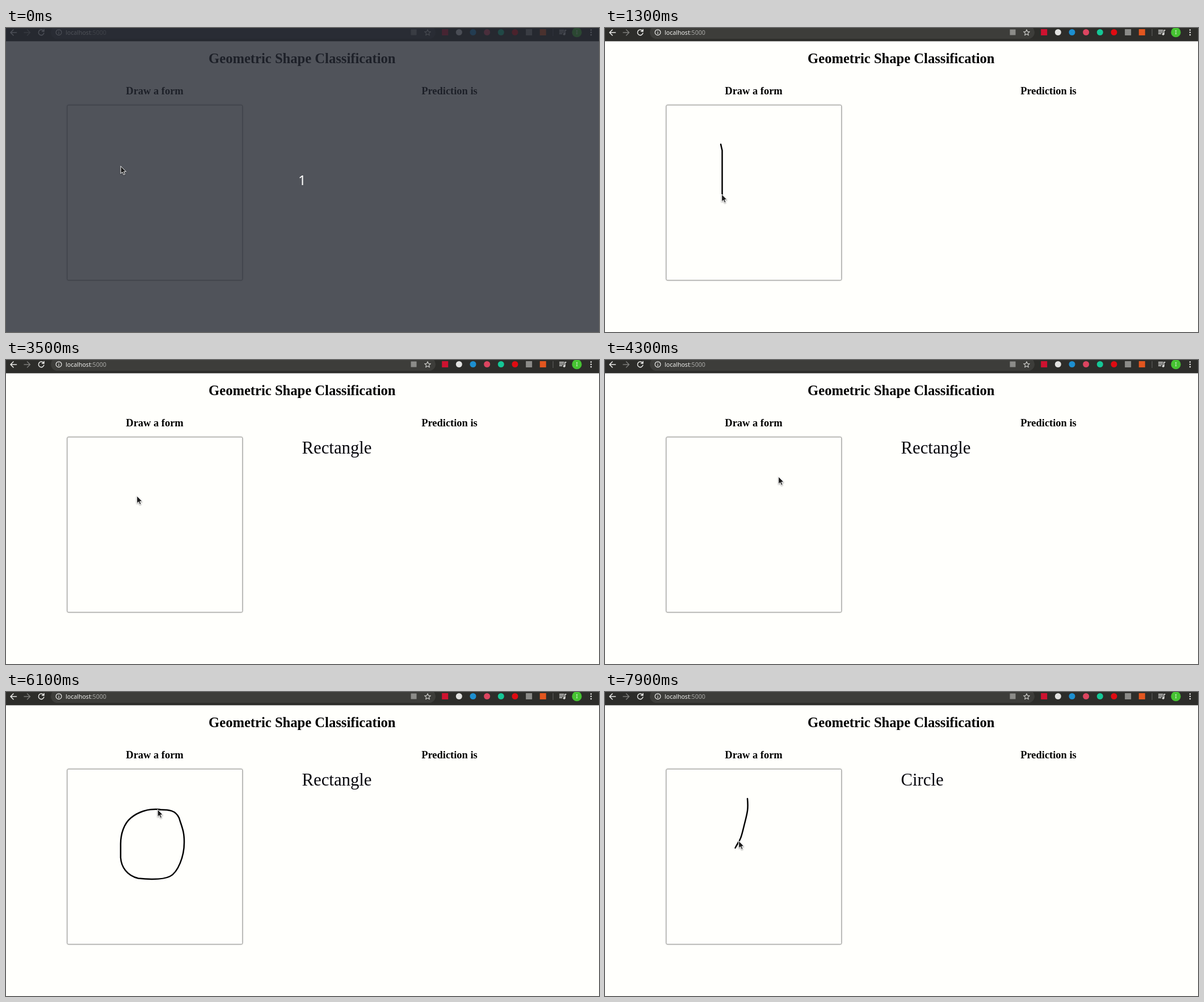
Recreate the animation shown at these times as an HTML page. Size 1045x536 px, loop 8 s.

```html
<!DOCTYPE html>
<html lang="en">
<head>
<meta charset="utf-8">
<title>Geometric Shape Classification</title>
<style>
  html, body { margin: 0; width: 100%; height: 100%; overflow: hidden; background: #fffffc; }
  svg { display: block; width: 1045px; height: 536px; }
  .serif { font-family: "Liberation Serif", "Times New Roman", serif; }
  .sans { font-family: "Noto Sans", "Open Sans", sans-serif; }
  .bold { font-weight: 700; text-anchor: middle; }
  .line, #paths { fill: none; stroke-linecap: round; stroke-linejoin: round; }
  .ink { stroke: #000; stroke-width: 2.5; }
  .box { filter: drop-shadow(0 0 .8px rgba(0, 0, 0, .35)); }
  #cursor { filter: drop-shadow(.5px 1px .8px rgba(0, 0, 0, .4)); }
</style>
</head>
<body>
<svg viewBox="0 0 1045 536">
  <rect width="1045" height="536" fill="#fffffc"/>

  <!-- browser bar -->
  <rect width="1045" height="23.4" fill="#2d2d2a"/>
  <rect x="79" y="-4" width="678" height="23" rx="11.5" fill="#3d3d3a"/>
  <g class="line" stroke="#ececea" stroke-width="1.5">
    <path d="M18.5 8H8.5M13 3L8 8L13 13"/>
    <path d="M32 8H42M37.5 3L42.5 8L37.5 13" stroke="#7c7c79"/>
    <path d="M66 5A4.8 4.8 0 1 0 66.8 9M67 2.5V6H63.5"/>
    <g stroke-width="1.2">
      <circle cx="93" cy="7.7" r="4.9"/>
      <path d="M93 7.5V10.2M93 5.2V5.3"/>
      <path d="M743 2.8L744.5 6.3L748.3 6.6L745.4 9.1L746.3 12.8L743 10.8L739.7 12.8L740.6 9.1L737.7 6.6L741.5 6.3Z" stroke="#c9c9c6"/>
    </g>
    <path d="M975.5 4H983M975.5 7H983M975.5 10H980M985 10.5V4H987" stroke-width="1.3"/>
    <circle cx="983.7" cy="10.7" r="1.2"/>
  </g>
  <text class="sans" x="105" y="11.5" font-size="10.6" fill="#f0f0ee">localhost<tspan fill="#a8a8a5">:5000</tspan></text>
  <rect x="713.5" y="2.5" width="10" height="10" fill="#8c8c89"/>
  <g id="badges"></g>
  <path d="M964 2V14" stroke="#656562"/>
  <circle cx="1006" cy="7.7" r="8.6" fill="#46c332"/>
  <text class="sans" x="1006" y="11" font-size="9" fill="#eef8ec" text-anchor="middle">I</text>
  <path class="line" d="M1031 3.5h.01m0 4.3h.01m0 4.3h.01" stroke="#ececea" stroke-width="2.6"/>

  <!-- page -->
  <g class="serif" fill="#000">
    <text class="bold" x="521.8" y="62" font-size="24.62">Geometric Shape Classification</text>
    <text class="bold" x="262" y="116.6" font-size="18.46">Draw a form</text>
    <text class="bold" x="781.5" y="116.6" font-size="18.46">Prediction is</text>
    <text id="label" x="521.5" y="165" font-size="30.77" fill="#08080e"></text>
  </g>
  <rect class="box" x="108" y="136" width="308.7" height="308.7" rx="2" fill="#fffffc" stroke="#9c9c9a"/>
  <g id="paths"></g>

  <g id="veil">
    <rect width="1045" height="536" fill="#252932" opacity=".8"/>
    <text class="sans" x="521.8" y="277" font-size="24" fill="#fff" text-anchor="middle">1</text>
  </g>
  <path id="cursor" d="M-.9 -.5V12.7L2.2 10L4.3 14.8L6.6 13.8L4.5 9.2H8.6Z" fill="#1c1c1c" stroke="#fff"/>
</svg>

<script>
const LOOP = 8000, STEP = 100;
const $ = id => document.getElementById(id);

function add(parent, tag, attrs) {
  const el = document.createElementNS('http://www.w3.org/2000/svg', tag);
  for (const name in attrs) el.setAttribute(name, attrs[name]);
  return parent.appendChild(el);
}

const reds = '#cf1230 #e2e2e0 #1d8fd0 #dc4560 #15c796 #e00b12 #8b8b88 #e2561f';
reds.split(' ').forEach((fill, i) => add($('badges'), 'rect', {
  x: 768.2 + 24.65 * i, y: 2, width: 11, height: 11, rx: i % 6 && i < 6 ? 5.5 : 0, fill
}));

const ramp = (t, a, b) => Math.min(1, Math.max(0, (t - a) / (b - a)));

// pointer glides to a new place, slowing down
const glide = (from, to, d) => ({ from, d, dist: (t, len) => len * (1 - (1 - ramp(t, from, to)) ** 1.5) });

// pointer draws a line, visible until cleared
const stroke = (from, clear, d, dist, lag = 0) => ({ from, clear, d, dist, lag });

const trips = [
  glide(500, 900, 'M203 244Q199 225 204 205'),
  stroke(900, 3200,
    'M204 205L206.5 216V316L232 315.5L246 313.5H307L319 316V305L313 240V228L311 222V196L308 193.5L207 194.5',
    t => 111 * ramp(t, 900, 1400) + 224 * ramp(t, 1400, 2100) + 14 * ramp(t, 2200, 2300)
       + 72 * ramp(t, 2300, 2500) + 29 * ramp(t, 2800, 2900)),
  glide(3300, 4200, 'M207 195C241 251 256 321 297 214'),
  glide(4200, 5100, 'M297 214C326 191 326 183 271 207'),
  stroke(5100, 6500,
    'M271 207C250 205 232 212 220 222S202 250 202 268V292C203 308 213 324 233 328.5C252 330.5 275 332 289 325'
    + 'S314 290 314 266C314.5 245 309 236 305 222C299 209 288 207 268 207.5',
    (t, len) => len * ramp(t, 5100, 6100)),
  glide(6400, 7300, 'M268 207.5Q262 230 231 272'),
  glide(7300, 7400, 'M231 272L242 222'),
  glide(7500, 7600, 'M242 222L251 188'),
  stroke(7600, LOOP, 'M251 188C253 210 250 215 244 240S237 260 229.5 275',
    (t, len) => len * ramp(t, 7590, 7900), 14)
];

for (const trip of trips) {
  trip.path = add($('paths'), 'path', { d: trip.d, class: trip.clear ? 'ink' : '' });
  trip.len = trip.path.getTotalLength();
}

function draw(time) {
  const t = Math.floor((time % LOOP) / STEP) * STEP;
  for (const { path, from, clear, dist, len } of trips) {
    path.style.display = t >= from && t < clear ? '' : 'none';
    if (clear) path.setAttribute('stroke-dasharray', `${dist(t, len) + .1} 999`);
  }
  const trip = trips.filter(p => p.from <= t).pop() || trips[0];
  const at = Math.max(0, trip.dist(t, trip.len) - (trip.lag || 0));
  const { x, y } = trip.path.getPointAtLength(at);
  $('cursor').setAttribute('transform', `translate(${x} ${y})`);
  $('label').textContent = t < 3200 ? '' : t < 6500 ? 'Rectangle' : 'Circle';
  $('veil').style.display = t < 100 ? '' : 'none';
}

const start = performance.now();
function tick() {
  draw(performance.now() - start);
  requestAnimationFrame(tick);
}
tick();
</script>
</body>
</html>
```
